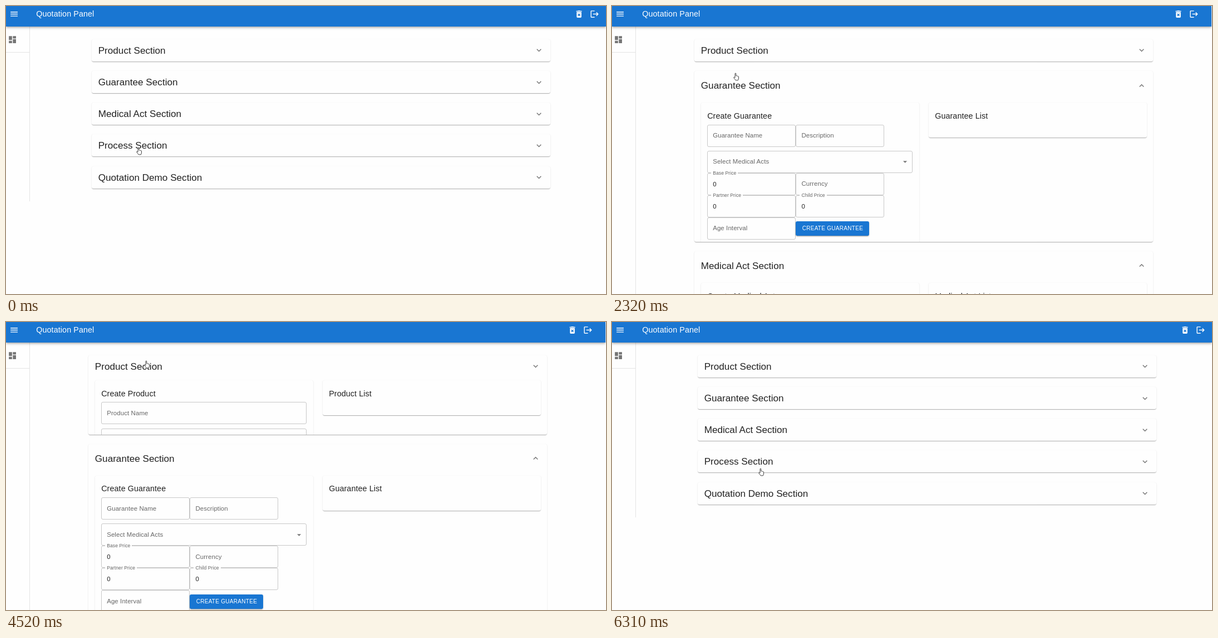
An HTML page that plays this animation: 1078x519 px, repeating every 6450 ms.

```html
<!DOCTYPE html>
<html lang="en">
<head>
<meta charset="utf-8">
<title>Quotation Panel</title>
<style>
html, body { margin: 0; width: 100%; height: 100%; overflow: hidden; background: #fefefe; }
body { font-family: "Liberation Sans", Arial, sans-serif; color: rgba(0,0,0,.87); }
#stage { position: relative; width: 1078px; height: 519px; overflow: hidden; }
#stage div, #stage svg { position: absolute; box-sizing: border-box; }
.txt { white-space: nowrap; line-height: 20px; height: 20px; }
.h5 { font-size: 17.14px; }
.h6 { font-size: 14.29px; letter-spacing: .0075em; }
.body { font-size: 11.43px; letter-spacing: .00938em; }
.small { font-size: 8.57px; letter-spacing: .00938em; }
.soft { color: rgba(0,0,0,.6); }
.paper { background: #fefefe; border-radius: 3px;
  box-shadow: 0 1.43px .71px -.71px rgba(0,0,0,.2), 0 .71px .71px rgba(0,0,0,.14), 0 .71px 2.14px rgba(0,0,0,.12); }
.section { width: 823.4px; }
.clip { left: 0; width: 100%; overflow: hidden; }
.field { border: 1px solid rgba(0,0,0,.21); border-radius: 3px; height: 40px; }
.notch { height: 3px; background: #fefefe; }
.btn { height: 26px; border-radius: 3px; background: #1976d2; color: #fff; text-align: center;
  font-size: 10px; line-height: 25px; letter-spacing: .02857em; white-space: nowrap;
  box-shadow: 0 2.1px .7px -1.4px rgba(0,0,0,.2), 0 1.4px 1.4px rgba(0,0,0,.14), 0 .7px 3.6px rgba(0,0,0,.12); }
#bar { left: 0; top: 0; right: 0; height: 37px; background: #1976d2; color: #fff;
  box-shadow: 0 1.4px 2.9px -.7px rgba(0,0,0,.2), 0 2.9px 3.6px rgba(0,0,0,.14), 0 .7px 7.1px rgba(0,0,0,.12); }
#side { left: 0; top: 37px; width: 43px; border-right: 1px solid rgba(0,0,0,.1); }
#rule { left: 0; top: 83px; width: 42px; height: 1px; background: rgba(0,0,0,.1); }
#spot { width: 17px; height: 17px; border-radius: 50%; background: rgba(255,247,30,.72); }
#hand, #arrow { overflow: visible; fill: #fff; stroke: #222; stroke-width: .85; stroke-linejoin: round; }
</style>
</head>
<body>
<div id="stage"></div>
<script>
const LOOP = 6450, TICK = 66.4;
const stage = document.getElementById('stage');
const GREY = 'rgba(0,0,0,.54)';
const ICON = {
  menu: 'M3 18h18v-2H3v2zm0-5h18v-2H3v2zm0-7v2h18V6H3z',
  board: 'M3 13h8V3H3v10zm0 8h8v-6H3v6zm10 0h8V11h-8v10zm0-18v6h8V3h-8z',
  bin: 'M6 19c0 1.1.9 2 2 2h8c1.1 0 2-.9 2-2V7H6v12zm2.46-7.12l1.41-1.41L12 12.59l2.12-2.12 1.41 1.41L13.41 14l2.12 2.12-1.41 1.41L12 15.41l-2.12 2.12-1.41-1.41L10.59 14l-2.13-2.12zM15.5 4l-1-1h-5l-1 1H5v2h14V4z',
  exit: 'M17 7l-1.41 1.41L18.17 11H8v2h10.17l-2.58 2.58L17 17l5-5zM4 5h8V3H4c-1.1 0-2 .9-2 2v14c0 1.1.9 2 2 2h8v-2H4V5z',
  more: 'M16.59 8.59 12 13.17 7.41 8.59 6 10l6 6 6-6z',
  drop: 'M7 10l5 5 5-5z'
};

function box(parent, cls, x, y, w, h) {
  const el = document.createElement('div');
  el.className = cls;
  if (x !== undefined) el.style.left = x + 'px';
  if (y !== undefined) el.style.top = y + 'px';
  if (w !== undefined) el.style.width = w + 'px';
  if (h !== undefined) el.style.height = h + 'px';
  return parent.appendChild(el);
}
function text(parent, cls, x, midY, str) {
  const el = box(parent, 'txt ' + cls, x, midY - 10);
  el.textContent = str;
  return el;
}
function svg(parent, size, path, id) {
  const ns = 'http://www.w3.org/2000/svg';
  const el = document.createElementNS(ns, 'svg');
  const p = document.createElementNS(ns, 'path');
  p.setAttribute('d', path);
  el.setAttribute('viewBox', `0 0 ${size} ${size}`);
  if (id) el.id = id;
  el.appendChild(p);
  return parent.appendChild(el);
}
function icon(parent, name, midX, midY, color) {
  const el = svg(parent, 24, ICON[name]);
  el.style.cssText = `left:${midX - 8.57}px;top:${midY - 8.57}px;width:17.14px;height:17.14px;fill:${color}`;
  return el;
}

// Form parts, placed relative to the top left of their section
const HEAD = 52, X1 = 22.8, X2 = 182, FULL = 369.3, HALF = 159;
function field(p, x, y, w, label) {
  box(p, 'field', x, y - HEAD, w);
  text(p, 'body soft', x + 10, y - HEAD + 19.5, label);
}
function select(p, y, label) {
  field(p, X1, y, FULL, label);
  icon(p, 'drop', 378, y - HEAD + 20, GREY);
}
function price(p, x, y, label, notchW) {
  box(p, 'field', x, y - HEAD, HALF);
  box(p, 'notch', x + 7, y - HEAD - 1, notchW);
  text(p, 'small soft', x + 10, y - HEAD - .3, label);
  text(p, 'body', x + 10, y - HEAD + 20, '0');
}
function button(p, x, y, w, label) {
  box(p, 'btn', x, y - HEAD, w).textContent = label;
}
function cards(p, name, h) {
  box(p, 'paper', 11.4, 57 - HEAD, 392, h);
  box(p, 'paper', 420.4, 57 - HEAD, 392, 63);
  text(p, 'h6', X1, 80.5 - HEAD, 'Create ' + name);
  text(p, 'h6', 431.8, 80.5 - HEAD, name + ' List');
}
function productForm(p) {
  cards(p, 'Product', 327.5);
  ['Product Name', 'Description', 'Currency', 'Zone'].forEach((s, i) =>
    field(p, X1, 96.4 + i * 47.15, FULL, s));
  select(p, 292, 'Select Guarantees');
  button(p, X1, 346.5, FULL, 'CREATE PRODUCT');
}
function guaranteeForm(p) {
  cards(p, 'Guarantee', 258.5);
  field(p, X1, 96.5, HALF, 'Guarantee Name');
  field(p, X2, 96.5, HALF, 'Description');
  select(p, 143.7, 'Select Medical Acts');
  field(p, X2, 183.7, HALF, 'Currency');
  price(p, X1, 183.7, 'Base Price', 48);
  price(p, X1, 223.7, 'Partner Price', 57);
  price(p, X2, 223.7, 'Child Price', 49);
  field(p, X1, 263.5, HALF, 'Age Interval');
  button(p, X2, 271.3, 132, 'CREATE GUARANTEE');
}
function medicalForm(p) {
  cards(p, 'Medical Act', 249);
  ['Name', 'Family', 'Code'].forEach((s, i) =>
    field(p, X1, 108.2 + i * 57.15, FULL, `Medical Act ${s}\u2009*`));
  button(p, X1, 268.4, 137, 'CREATE MEDICAL ACT');
}

// on / off: the moments of the opening and closing clicks
const sections = [
  { name: 'Product', full: 396, form: productForm, on: 3120, off: 4320 },
  { name: 'Guarantee', full: 327, form: guaranteeForm, on: 2050, off: 5040 },
  { name: 'Medical Act', full: 317, form: medicalForm, on: 530, off: 5640 },
  { name: 'Process' },
  { name: 'Quotation Demo' }
];
for (const s of sections) {
  s.el = box(stage, 'section paper');
  s.title = text(s.el, 'h5', 11.4, 20, s.name + ' Section');
  s.arrow = icon(s.el, 'more', 803.6, 20, GREY);
  if (s.form) {
    s.clip = box(s.el, 'clip');
    s.form(s.clip);
  }
}

const side = box(stage, '');
side.id = 'side';
box(stage, '').id = 'rule';
icon(stage, 'board', 11.4, 60.6, GREY);
const bar = box(stage, '');
bar.id = 'bar';
icon(bar, 'menu', 14.2, 14.4, '#fff');
text(bar, 'h6', 54.3, 14.3, 'Quotation Panel');
const bin = icon(bar, 'bin', 1029.3, 14.4, '#fff');
const exit = icon(bar, 'exit', 1057.8, 14.4, '#fff');

const spot = box(stage, '');
spot.id = 'spot';
const hand = svg(stage, 14, 'M3 8.5V1.6Q3 .6 3.9 .6T4.8 1.6V5.2Q6.5 4.8 6.6 5.7Q8 5.3 8.1 6.2Q9.5 6 9.5 7V9.5Q9.5 11.5 8.3 13.4H4.2Q3 11.5 .8 8.9Q.3 7.9 1.3 7.7Q2 7.6 3 8.7Z', 'hand');
const arrow = svg(stage, 14, 'M.5 .5V10.5L2.8 8.4 4.3 11.6 5.8 11 4.4 7.9H7.4Z', 'arrow');
for (const c of [hand, arrow]) c.style.width = c.style.height = '14px';

// Pointer tip: time, x, y
const path = [
  [0, 238, 255], [199, 236, 200], [1130, 234, 198], [1394, 221.5, 125],
  [1528, 221.5, 125], [1660, 221.5, 135], [2120, 221.5, 135], [2258, 222, 121],
  [2440, 222, 121], [2656, 235, 82], [2722, 239, 76], [3320, 239, 76],
  [3585, 273, 142.5], [4117, 273, 142.5], [4316, 252, 70], [4780, 252, 70],
  [4980, 249.5, 122], [5450, 249.5, 122], [5644, 245.5, 177], [6043, 245.5, 177],
  [6109, 246, 209], [6308, 267, 264], [LOOP, 267, 264]
];

const clamp = v => Math.min(1, Math.max(0, v));
// cubic-bezier(.4, 0, .2, 1)
function ease(x) {
  if (x <= 0 || x >= 1) return clamp(x);
  let a = 0, b = 1, s = .5;
  for (let i = 0; i < 20; i++) {
    const r = 1 - s;
    if (1.2 * r * r * s + .6 * r * s * s + s * s * s < x) a = s; else b = s;
    s = (a + b) / 2;
  }
  return s * s * (3 - 2 * s);
}
function openness(s, t, dur) {
  if (!s.form) return 0;
  const after = click => ease((t - click - 45) / dur);
  return after(s.on) - after(s.off);
}
function pointer(t) {
  const i = Math.max(1, path.findIndex(p => p[0] >= t));
  const [a, b] = [path[i - 1], path[i]];
  const f = clamp((t - a[0]) / (b[0] - a[0]));
  return [a[1] + (b[1] - a[1]) * f, a[2] + (b[2] - a[2]) * f];
}

function draw(now) {
  const t = Math.min(LOOP, Math.floor((now % LOOP + 10) / TICK) * TICK);
  const [px, py] = pointer(t);
  let y = 60, onHead = false;
  for (const s of sections) {
    const turn = openness(s, t, 150);
    const head = 40 + 12 * turn;
    const body = s.form ? openness(s, t, 335) * (s.full - HEAD) : 0;
    s.el.style.top = y + 'px';
    s.el.style.height = head + body + 'px';
    s.title.style.top = head / 2 - 10 + 'px';
    s.arrow.style.top = head / 2 - 8.57 + 'px';
    s.arrow.style.transform = `rotate(${180 * turn}deg)`;
    if (s.clip) {
      s.clip.style.top = head + 'px';
      s.clip.style.height = body + 'px';
    }
    if (py >= y && py <= y + head) onHead = true;
    y += head + body + 17.15;
  }
  const pageH = y + 6.5;
  const scrolls = pageH > 519;
  for (const s of sections) s.el.style.left = (scrolls ? 148.4 : 154.3) + 'px';
  bin.style.transform = exit.style.transform = scrolls ? 'translateX(-12px)' : '';
  bar.style.right = scrolls ? '1px' : '0';
  side.style.height = Math.min(519, pageH) - 37 + 'px';

  const pressed = sections.some(s => s.form &&
    [s.on, s.off].some(c => t >= c - 6 && t < c + 56));
  spot.style.display = pressed ? '' : 'none';
  spot.style.transform = `translate(${px - 9}px,${py - 9}px)`;
  hand.style.display = onHead ? '' : 'none';
  arrow.style.display = onHead ? 'none' : '';
  hand.style.transform = `translate(${px - 4}px,${py - .5}px)`;
  arrow.style.transform = `translate(${px - .5}px,${py - .5}px)`;
}

const start = performance.now();
function frame() {
  draw(performance.now() - start);
  requestAnimationFrame(frame);
}
frame();
</script>
</body>
</html>
```
